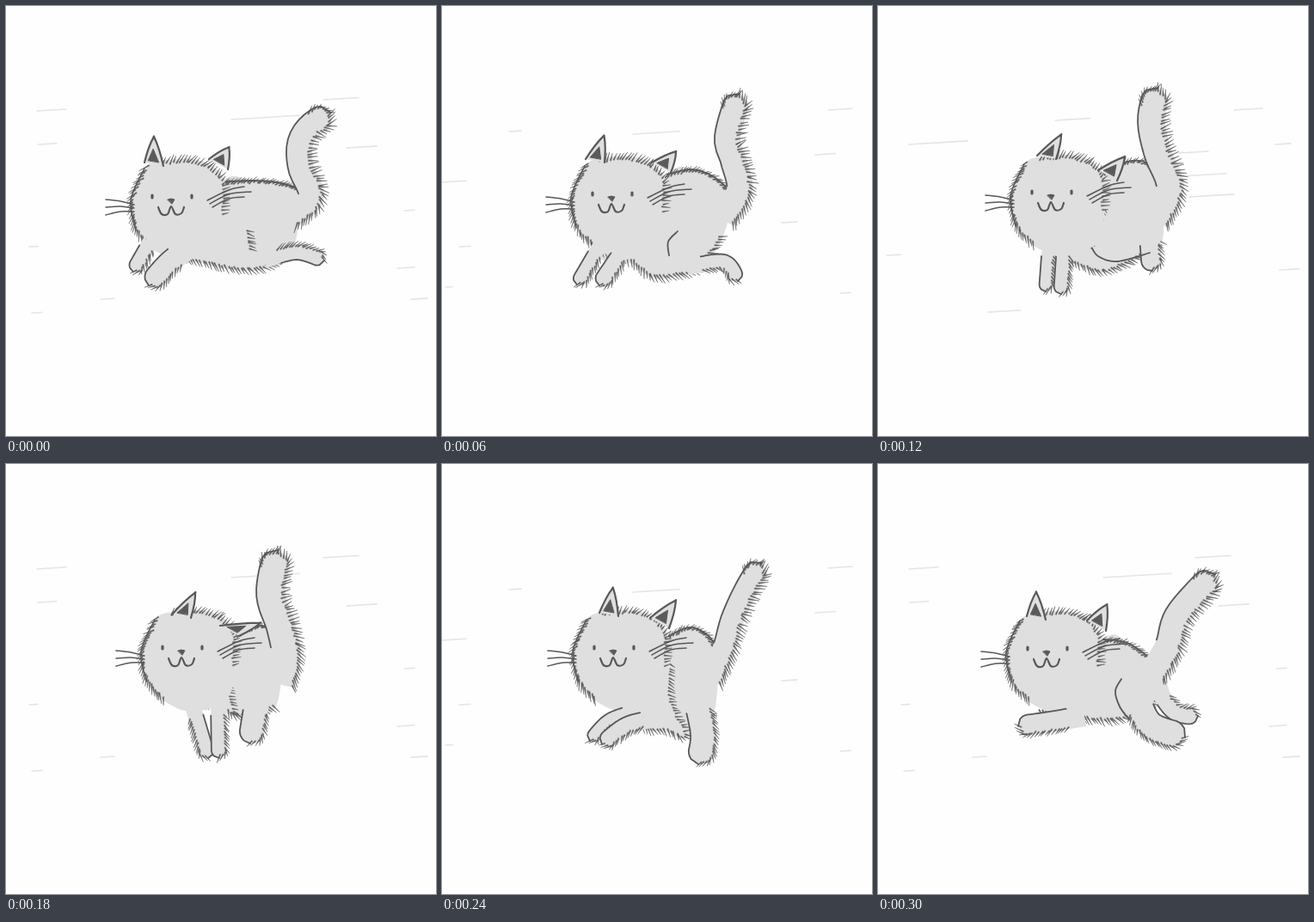
Recreate the animation shown at these times as an HTML page. Size 500x500 px, loop 360 ms.

```html
<!DOCTYPE html>
<html lang="en">
<head>
<meta charset="utf-8">
<title>Running cat</title>
<style>
html, body { margin: 0; width: 100%; height: 100%; overflow: hidden; background: #fefefe; }
svg { display: block; width: 100vw; height: 100vh; }
path { stroke-linecap: round; stroke-linejoin: round; fill: none; }
.fur { fill: #dfdfdf; }
.line { stroke: #585858; stroke-width: 1.8; }
.thin { stroke: #585858; stroke-width: 1.5; }
.bold { stroke: #585858; stroke-width: 2.2; }
.eye { stroke: #585858; stroke-width: 3.2; }
.hair { fill: #5a5a5a; stroke: #5a5a5a; stroke-width: .4; }
.dark { fill: #5a5a5a; stroke: #5a5a5a; }
.speed { stroke: #e4e4e4; stroke-width: 1.6; }
</style>
</head>
<body>
<svg id="stage" viewBox="0 0 500 500"></svg>
<script>
const NS = 'http://www.w3.org/2000/svg';
const STEP = 60;
const stage = document.getElementById('stage');
let group, seed = 977;

const random = () => (seed = (seed * 16807) % 2147483647) / 2147483647;

function make(tag, parent) {
  const el = document.createElementNS(NS, tag);
  if (parent) parent.appendChild(el);
  return el;
}

function add(cls, d) {
  const el = make('path', group);
  el.setAttribute('class', cls);
  el.setAttribute('d', d);
}

// "x y x y" to points, moved by an offset
function points(text, ox = 0, oy = 0) {
  const v = text.split(' ').map(Number);
  return v.filter((_, i) => i % 2 === 0).map((x, i) => [x + ox, v[2 * i + 1] + oy]);
}

const poly = pts => 'M' + pts.join('L');

// Smooth curve through points
function curve(pts, closed) {
  const n = pts.length;
  const at = i => pts[closed ? (i + n) % n : Math.max(0, Math.min(n - 1, i))];
  let d = 'M' + at(0);
  for (let i = 0; i < (closed ? n : n - 1); i++) {
    const [a, b, c, e] = [at(i - 1), at(i), at(i + 1), at(i + 2)];
    const p = b.map((x, k) => x + (c[k] - a[k]) / 6);
    const q = c.map((x, k) => x - (e[k] - b[k]) / 6);
    d += `C${p} ${q} ${c}`;
  }
  return d + (closed ? 'Z' : '');
}

// Places along a path, each with its direction
function walk(d, count) {
  const path = make('path');
  path.setAttribute('d', d);
  const len = path.getTotalLength();
  const n = count || Math.max(2, Math.round(len / 3.8));
  return Array.from({ length: n + 1 }, (_, i) => {
    const s = len * i / n;
    const a = path.getPointAtLength(Math.max(0, s - 1));
    const b = path.getPointAtLength(Math.min(len, s + 1));
    const h = Math.hypot(b.x - a.x, b.y - a.y) || 1;
    const p = path.getPointAtLength(s);
    return { x: p.x, y: p.y, tx: (b.x - a.x) / h, ty: (b.y - a.y) / h, t: i / n, rest: len - s };
  });
}

// Tapered hairs on one side of a path; lean tips them along it
function hairs(d, side, size, lean, lean2 = lean) {
  const out = walk(d).map(({ x, y, tx, ty, t }) => {
    const k = lean + (lean2 - lean) * t + (random() - .5) * .5;
    const len = size * (.75 + random() * .5) / Math.hypot(1, k);
    const dx = (ty * side + tx * k) * len, dy = (-tx * side + ty * k) * len;
    const h = Math.hypot(dx, dy), nx = -dy / h * .75, ny = dx / h * .75;
    const jx = x + tx * (random() - .5) * 2, jy = y + ty * (random() - .5) * 2;
    const ax = jx - dx * .45, ay = jy - dy * .45;
    return `M${ax + nx} ${ay + ny}L${jx + dx * .55} ${jy + dy * .55}L${ax - nx} ${ay - ny}Z`;
  });
  add('hair', out.join(''));
}

// Rounded tube: a line on one side, hairs on the other; negative width swaps them
function limb(width, text, isTail) {
  const w = Math.abs(width), side = Math.sign(width);
  const spine = walk(curve(points(text)), 24);
  const edge = sign => spine.map(({ x, y, tx, ty, rest }) => {
    const r = rest < w / 2 ? Math.sqrt(rest * (w - rest)) : w / 2;
    return [x + ty * r * sign, y - tx * r * sign];
  });
  const lined = edge(side), furry = edge(-side);
  add('fur', poly([...lined, ...furry.slice().reverse()]) + 'Z');
  add('line', poly(lined.slice(isTail ? 7 : 6)));
  if (isTail) {
    hairs(poly(furry), -side, 11, -1.2, .9);
    hairs(poly(lined.slice(-4)), side, 9, 1.2);
  } else {
    hairs(poly(furry.slice(7)), -side, 9, 1.2);
  }
}

const tail = (width, text) => limb(width, text, true);

function body(back, belly) {
  const top = points(back), low = points(belly);
  add('fur', curve([...top, ...low.slice().reverse()], true));
  add('line', curve(top));
  hairs(curve(top), 1, 10, 1.2);
  hairs(curve(low), -1, 10, .8);
}

const tuft = text => hairs(curve(points(text)), 1, 8, .5);
const fold = text => add('line', curve(points(text)));

function ear(x, y, tipX, tipY, tilt) {
  const ax = x - 11, bx = x + 11, ay = y - tilt, by = y + tilt;
  const mix = (p, q, r) => [ax * p + tipX * q + bx * r, ay * p + tipY * q + by * r];
  const d = `M${ax} ${ay}Q${mix(.5, .58, -.08)} ${mix(.06, .92, .02)}Q${tipX} ${tipY} ` +
    `${mix(.02, .92, .06)}Q${mix(-.08, .58, .5)} ${bx} ${by}`;
  add('fur', d);
  add('bold', d);
  add('dark', `M${mix(.75, .1, .15)}L${mix(.28, .52, .2)}L${mix(.2, .1, .7)}Z`);
}

const skull = '-32 -32 -12 -41 20 -43 45 -36 62 -16 62 20 52 60 12 75 -22 62 -42 40 -48 5';

// Head around the midpoint of the eyes
function head(x, y, left, right) {
  const at = text => points(text, x, y);
  const shape = at(skull);
  const [top, cheek, jaw] = [shape.slice(1, 4), shape.slice(3, 6), [shape[0], shape[10], shape[9], shape[8]]];
  add('fur', curve(shape, true));
  hairs(curve(top), 1, 10, .6);
  hairs(curve(cheek), 1, 9, -.2);
  hairs(curve(jaw), -1, 11, 1.3);
  add('thin', curve(jaw.slice(0, 3)));
  ear(...left, 2);
  ear(...right, 6);
  for (const k of [-1, 0, 1]) {
    add('thin', curve([[x - 77, y + 13 + k * 9], [x - 60, y + 12 + k * 6], [x - 44, y + 14 + k * 4]]));
    add('thin', curve([[x + 44 + k * 3, y + 9 + k * 4], [x + 66, y - 2 + k * 5], [x + 92 - k * k * 8, y - 5 + k * 6]]));
  }
  add('eye', `M${x - 23} ${y - 1}v3M${x + 23} ${y - 1}v3`);
  add('dark', `M${x - 5} ${y + 4}q4 -2 8 0l-3 5z`);
  add('bold', curve(at('-16 13 -12 21 -5 21 -1 12 4 21 11 20 14 13')));
}

// Speed lines: x, y and length
function speed(text) {
  const v = text.split(' ').map(Number);
  for (let i = 0; i < v.length; i += 3) add('speed', `M${v[i]} ${v[i + 1]}l${v[i + 2]} ${-v[i + 2] * .06}`);
}

const near = () => speed('36 122 34 37 161 22 262 132 79 369 109 41 396 165 35 463 238 12 455 305 20 471 341 19 110 341 16 30 357 12 27 280 10');
const middle = () => speed('78 146 14 0 205 28 222 149 54 449 121 28 434 173 24 395 252 18 463 334 12 20 280 13 4 327 8');
const far = () => speed('36 161 68 206 133 40 414 121 33 462 161 18 10 290 17 350 171 34 352 198 53 362 222 52 467 307 23 128 356 38');

function stretch() {
  near();
  body('250 205 285 203 315 205 343 213', '185 292 222 298 265 307 300 306 332 288');
  tail(30, '328 246 355 222 343 188 342 160 354 140 378 124');
  limb(-18, '300 296 338 286 370 296');
  tuft('284 262 287 284');
  head(193, 221, [172, 184, 172, 150], [247, 184, 260, 163]);
  limb(-18, '168 274 148 309');
  limb(-26, '208 284 188 300 166 325');
}

function land() {
  middle();
  body('262 196 290 190 315 198 336 216', '180 285 218 298 245 316 275 314 300 306 327 268');
  tail(30, '326 248 346 215 339 180 332 152 346 102');
  limb(18, '285 304 328 298 344 320');
  fold('274 262 263 274 264 290');
  head(198, 218, [178, 180, 189, 149], [255, 188, 273, 168]);
  limb(-17, '184 278 157 324');
  limb(-20, '212 282 183 325');
}

function gather() {
  far();
  body('262 194 290 181 312 182 328 202', '192 284 228 300 260 310 295 298 330 275');
  tail(32, '322 250 340 212 325 170 318 132 326 95');
  limb(-24, '316 268 319 308');
  fold('247 278 256 291 278 297 316 287');
  tuft('264 238 252 262 247 280');
  head(202, 216, [196, 176, 214, 148], [267, 197, 288, 174]);
  limb(-16, '199 278 195 332');
  limb(-18, '217 278 213 335');
}

function bunch() {
  near();
  body('264 200 298 188 320 204', '200 280 240 282 270 294 313 284');
  tail(34, '318 256 326 225 320 190 308 150 317 100');
  limb(-29, '292 276 284 325');
  tuft('258 225 260 255 268 292');
  head(205, 213, [204, 177, 221, 148], [260, 194, 298, 184]);
  limb(18, '216 278 235 342');
  limb(-18, '247 276 248 342');
}

function push() {
  middle();
  body('264 200 288 190 310 200 320 218', '210 288 235 308 262 312 285 318 316 290');
  tail(27, '312 252 328 215 338 180 354 145 372 115');
  limb(-30, '294 266 304 315 298 349');
  tuft('268 235 268 275 285 310');
  head(200, 213, [194, 175, 199, 142], [253, 185, 273, 157]);
  limb(-16, '228 287 195 298 172 322');
  limb(-20, '250 296 215 304 186 326');
}

function leap() {
  near();
  body('262 204 290 208 314 224', '190 290 245 298 285 297 338 270');
  tail(32, '318 246 338 212 350 175 392 128');
  limb(-20, '325 262 345 288 372 293');
  limb(32, '298 265 316 303 357 318');
  fold('283 250 276 264 281 282 292 297');
  head(197, 214, [184, 179, 184, 147], [254, 188, 267, 162]);
  limb(-24, '240 293 200 300 163 305');
}

const frames = [stretch, land, gather, bunch, push, leap].map(pose => {
  group = make('g', stage);
  pose();
  return group;
});

function update(time) {
  const now = Math.floor(time / STEP) % frames.length;
  frames.forEach((g, i) => g.setAttribute('visibility', i === now ? 'visible' : 'hidden'));
}

const start = performance.now();
function tick() {
  update(performance.now() - start);
  requestAnimationFrame(tick);
}
tick();
</script>
</body>
</html>
```
